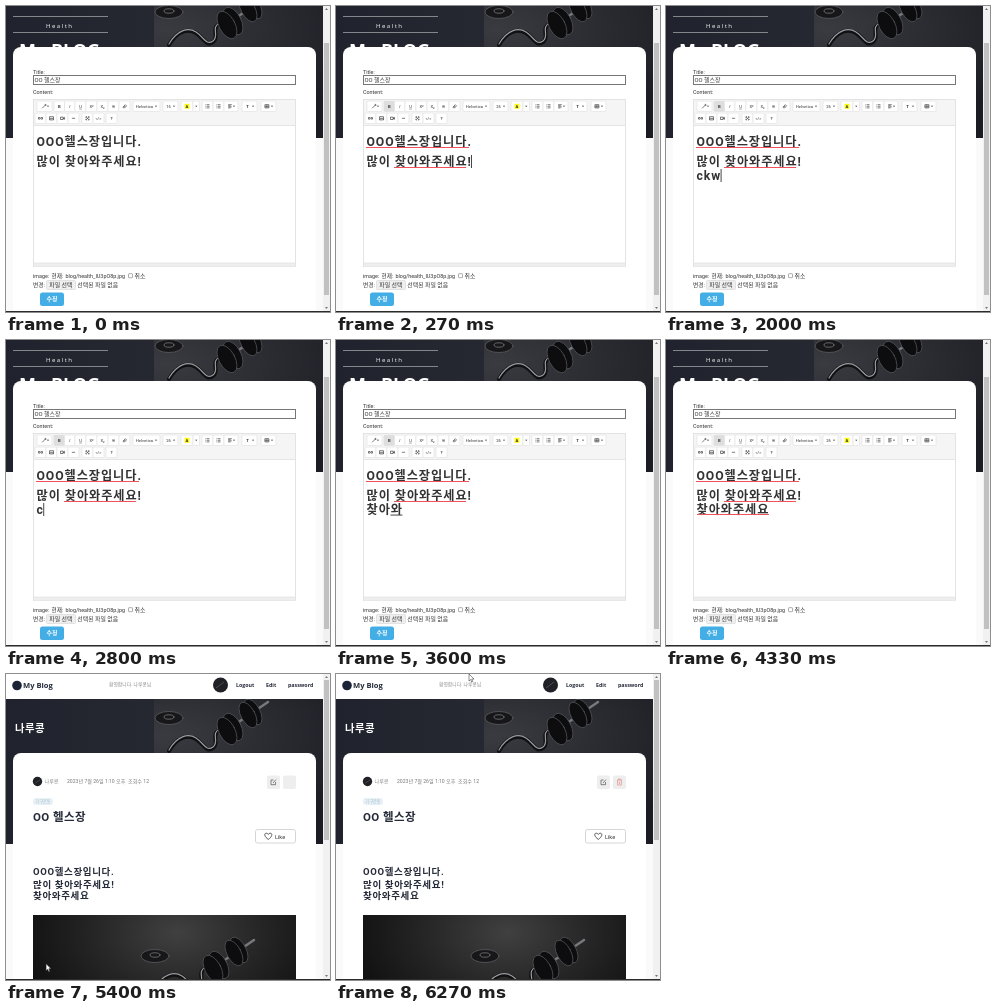
Animation, 324 px wide and 306 px high, one loop 6540 ms. Source, as an HTML page:

```html
<!DOCTYPE html>
<html lang="ko">
<head>
<meta charset="utf-8">
<title>Blog post edit</title>
<style>
  html, body { margin: 0; width: 100%; height: 100%; overflow: hidden; background: #fff; }
  svg { display: block; width: 324px; height: 306px; }
  text { font-family: Roboto, "Noto Sans CJK KR", "Noto Sans CJK", sans-serif; fill: #333; white-space: pre; }
  .brand { font-family: "Open Sans", "Noto Sans CJK KR", sans-serif; font-weight: 700; fill: #252b3a; }
  .bold { font-weight: 700; }
  .body { font-size: 12.2px; letter-spacing: .93px; }
  .post { font-size: 9.5px; letter-spacing: .65px; }
  .post text { fill: #242a38; }
  .mid { text-anchor: middle; }
  .icon { fill: none; stroke: #333; stroke-width: .8; }
</style>
</head>
<body>
<svg viewBox="0 0 324 306">
  <defs>
    <linearGradient id="navy">
      <stop offset="0" stop-color="#20232d"/><stop offset="1" stop-color="#262831"/>
    </linearGradient>
    <radialGradient id="floor" cx=".5" cy=".25" r=".7">
      <stop offset="0" stop-color="#3a3b41"/><stop offset=".5" stop-color="#2a2b31"/><stop offset="1" stop-color="#1b1c23"/>
    </radialGradient>
    <radialGradient id="studio" cx=".55" cy=".1" r=".65">
      <stop offset="0" stop-color="#404040"/><stop offset=".5" stop-color="#252525"/><stop offset="1" stop-color="#0d0d0d"/>
    </radialGradient>
    <g id="weights" fill="none" stroke-linecap="round">
      <ellipse cx="163" cy="44" rx="14" ry="6.5" fill="#17171a" stroke="#5b5c60" stroke-width=".8"/>
      <ellipse cx="163" cy="43" rx="5" ry="2.2" stroke="#77787c" stroke-width=".8"/>
      <path d="M163 77C171 63 182 60 190 65S200 79 207 74S204 60 214 56" stroke="#101012" stroke-width="4"/>
      <path d="M163 76C171 62 182 59 190 64S200 78 207 73S204 59 214 55" stroke="#9a9b9f" stroke-width="1.2"/>
      <path d="M218 58L262 28" stroke="#77787c" stroke-width="2.5"/>
      <g fill="#0d0d0f" stroke="#55565a" stroke-width=".7">
        <ellipse cx="247" cy="38" rx="7" ry="14" transform="rotate(-28 247 38)"/>
        <ellipse cx="242" cy="41" rx="7" ry="14" transform="rotate(-28 242 41)"/>
        <ellipse cx="227" cy="53" rx="8" ry="15" transform="rotate(-28 227 53)"/>
        <ellipse cx="221" cy="57" rx="8" ry="15" transform="rotate(-28 221 57)"/>
      </g>
    </g>
    <g id="hero">
      <rect y="25" width="317" height="145" fill="url(#floor)"/>
      <rect y="25" width="148" height="145" fill="url(#navy)"/>
      <use href="#weights"/>
    </g>
    <clipPath id="heroClip"><rect y="25" width="317" height="145"/></clipPath>
    <clipPath id="postClip"><rect x="27" y="241" width="263" height="65"/></clipPath>
  </defs>

  <g id="editPage">
    <rect width="324" height="306" fill="#fafafa"/>
    <g transform="translate(0 -38)"><use href="#hero" clip-path="url(#heroClip)"/></g>
    <path d="M7 10.5H102M7 26.5H102" stroke="#85868c" stroke-width="1"/>
    <text class="brand" x="40" y="22" font-size="6" letter-spacing="1.5" style="fill:#fff;font-weight:400">Health</text>
    <text class="brand" x="13" y="51" font-size="18" style="fill:#fff">My BLOG</text>
    <path d="M7 306V49a8 8 0 0 1 8-8H302a8 8 0 0 1 8 8V306Z" fill="#fff"/>

    <text x="27" y="68" font-size="5.4">Title:</text>
    <rect x="27.5" y="69.5" width="262" height="9" fill="#fff" stroke="#767676"/>
    <text x="28.5" y="76.3" font-size="5.9">OO 헬스장</text>
    <text x="27" y="88" font-size="5.4">Content:</text>

    <rect x="27.5" y="93.5" width="262" height="167" fill="#fff" stroke="#ddd" stroke-width=".8"/>
    <path d="M28 94H289V119.5H28Z" fill="#f5f5f5"/>
    <path d="M28 119.5H289" stroke="#ddd" stroke-width=".7"/>
    <rect x="28" y="257" width="261" height="3.5" fill="#eee"/>
    <path d="M28 257H289" stroke="#ddd" stroke-width=".6"/>
    <g id="toolbar"></g>

    <g class="bold body">
      <text x="30.5" y="140">OOO헬스장입니다.</text>
      <text x="30.5" y="160">많이 찾아와주세요!</text>
      <text id="typed" x="30.5" y="173.5"></text>
    </g>
    <path id="spelling" d="M30 141.5H133M58 161.5H130" stroke="#f0525c" stroke-width="1"/>
    <path id="lastSpelling" d="M31 174.5H103" stroke="#f0525c" stroke-width="1"/>
    <rect id="composing" y="174.6" width="12" height=".9" fill="#333"/>
    <rect id="caret" width=".9" height="13" fill="#333"/>

    <text x="27" y="272" font-size="5.4">image:</text>
    <text x="45.5" y="272" font-size="5.6">현재:</text>
    <text x="59.5" y="272" font-size="5.4">blog/health_IU3pO8p.jpg</text>
    <rect x="122.5" y="267.7" width="4" height="4" rx=".6" fill="#fff" stroke="#767676" stroke-width=".6"/>
    <text x="128.5" y="272" font-size="5.9">취소</text>
    <text x="27" y="281.3" font-size="5.7">변경:</text>
    <rect x="40.5" y="274.5" width="29" height="9" rx="1" fill="#efefef" stroke="#ccc" stroke-width=".5"/>
    <text x="43.3" y="281.3" font-size="5.9">파일 선택</text>
    <text x="71.3" y="281.3" font-size="5.9">선택된 파일 없음</text>
    <rect x="34" y="286.5" width="24" height="13.5" rx="2.5" fill="#43aee6"/>
    <text class="bold mid" x="46" y="295.4" font-size="5.9" style="fill:#fff">수정</text>
  </g>

  <g id="postPage">
    <rect width="324" height="306" fill="#fafafa"/>
    <rect width="317" height="25" fill="#fff"/>
    <circle cx="11" cy="11.5" r="4.8" fill="#1b2336"/>
    <text class="brand" x="17" y="14.2" font-size="7.6">My Blog</text>
    <text class="brand" x="230" y="13.4" font-size="5.3">Logout</text>
    <text class="brand" x="260" y="13.4" font-size="5.3">Edit</text>
    <text class="brand" x="282" y="13.4" font-size="5.3">password</text>
    <text x="103" y="11.6" font-size="4.8" style="fill:#888">환영합니다. 나루콩님</text>
    <circle cx="214.5" cy="11" r="7.5" fill="#202126"/>
    <path d="M210 14L218 8" stroke="#4c4d51" stroke-width="1"/>
    <use href="#hero" clip-path="url(#heroClip)"/>
    <text class="bold" x="9" y="58" font-size="10.4" letter-spacing=".4" style="fill:#fff">나루콩</text>
    <path d="M7 306V87a8 8 0 0 1 8-8H302a8 8 0 0 1 8 8V306Z" fill="#fff"/>

    <circle cx="31.5" cy="107.5" r="4.7" fill="#202126"/>
    <path d="M29 109L34 106" stroke="#4c4d51" stroke-width=".8"/>
    <g font-size="5.1">
      <text x="38.5" y="109.4" style="fill:#888">나루콩</text>
      <text x="61" y="109.4" style="fill:#777">2023년 7월 26일 1:10 오후</text>
      <text x="122" y="109.4" style="fill:#777">조회수 12</text>
    </g>
    <rect x="261" y="101.5" width="13" height="13.5" rx="2" fill="#eee"/>
    <path class="icon" style="stroke:#555;stroke-width:.7" d="M267.5 106H265V110.7H269.5V108M267 109L270 105.6"/>
    <rect x="277" y="101.5" width="13" height="13.5" rx="2" fill="#eee"/>
    <path id="trash" class="icon" style="stroke:#e39a9a" d="M281 106H286M282.5 106V105H284.5V106M281.6 106V111H285.4V106M283.5 107.5V110"/>
    <rect x="27" y="124" width="20" height="7" rx="3" fill="#e9f1f6"/>
    <text class="mid" x="37" y="129.2" font-size="4.2" style="fill:#9bb9c9">기구운동</text>
    <text class="bold" x="27" y="147.2" font-size="11.5" letter-spacing=".4" style="fill:#242a38">OO 헬스장</text>
    <rect x="249.5" y="155.5" width="40" height="13.5" rx="2" fill="#fff" stroke="#ccc" stroke-width=".8"/>
    <path class="icon" d="M262.3 165.4C256 161 259.5 157.3 262.3 160.3C265 157.3 268.6 161 262.3 165.4Z"/>
    <text x="269" y="164.5" font-size="5.6">Like</text>

    <g class="bold post">
      <text x="27" y="200.6">OOO헬스장입니다.</text>
      <text x="27" y="213.6">많이 찾아와주세요!</text>
      <text x="27" y="224.8">찾아와주세요</text>
    </g>
    <g clip-path="url(#postClip)">
      <rect x="27" y="241" width="263" height="175" fill="url(#studio)"/>
      <use href="#weights" transform="translate(-14 238)"/>
    </g>
  </g>

  <rect x="317" width="7" height="306" fill="#f1f1f1"/>
  <path d="M319 4L320.5 2L322 4ZM319 301L320.5 303L322 301Z" fill="#777"/>
  <rect id="thumb" x="318" width="5" fill="#c1c1c1"/>
  <rect y="305" width="324" height="1" fill="#2b2b2b"/>

  <g id="pointer" stroke-width=".5" stroke-linejoin="round" fill="#fff" stroke="#222">
    <path id="arrow" d="M0 0V7L1.6 5.6L2.7 8L3.8 7.5L2.7 5.1H5Z"/>
    <path id="hand" d="M0 0C-1 0-1 1-1 1V5L-2.2 4.2C-3 5-2.4 5.6 0 8.5H4.2C5.6 6 5.2 4 5 3.5L1 2.6V1C1 0 0 0 0 0Z"/>
    <path id="beam" d="M-1.5-4H1.5M0-4V4M-1.5 4H1.5" stroke-width=".8"/>
  </g>
</svg>

<script>
const LOOP = 6540, FOCUS = 70, ENTER = 1330, TYPING_DONE = 4330, POST_PAGE = 5400;
const el = id => document.getElementById(id);
const set = (id, attrs) => {
  for (const [name, value] of Object.entries(attrs)) el(id).setAttribute(name, value);
};
// 'inherit' keeps children of a hidden page hidden.
const show = (id, visible) => el(id).setAttribute('visibility', visible ? 'inherit' : 'hidden');

// Small icons are paths centred on 0,0.
const icons = {
  wand: 'M-3 2.5L1 -1.5M1 -3V-1M2.5 -1.5H.5',
  eraser: 'M-2 1L1 -2L2.5 -.5L0 2H-1.2ZM-.7 -.3L.8 1.2',
  list: 'M-2.5 -2H-1.7M-2.5 0H-1.7M-2.5 2H-1.7M-1 -2H2.5M-1 0H2.5M-1 2H2.5',
  align: 'M-3.5 -2H1M-3.5 -.7H-.5M-3.5 .7H1M-3.5 2H-.5',
  table: 'M-4.5 -2H.5V2H-4.5ZM-4.5 0H.5M-2 -2V2',
  link: 'M-.5 -1H-2.5V1H-.5M.5 -1H2.5V1H.5M-1.2 0H1.2',
  picture: 'M-2.5 -2H2.5V2H-2.5ZM-2 1.5L-.5 -.5L.5 .7L1.3 0L2.2 1.5',
  video: 'M-2.5 -1.5H.8V1.5H-2.5ZM.8 0L2.5 -1.2V1.2Z',
  rule: 'M-2 0H2',
  full: 'M-.6 -2H-2V-.6M.6 -2H2V-.6M-2 .6V2H-.6M2 .6V2H.6M-1.5 -1.5L1.5 1.5M1.5 -1.5L-1.5 1.5',
};
// [left, right, label or icon, has dropdown arrow]
const rows = [
  [100.3, [[31, 46, 'wand', 1], [48, 58.5, 'B'], [58.5, 69, 'I'], [69, 80, 'U'], [80, 91, 'X²'], [91, 102, 'X₂'],
    [102, 113, 'S'], [113, 124, 'eraser'], [127, 154, 'Helvetica', 1], [157, 172, 'size', 1], [175, 187, 'A'],
    [187, 193.5, '', 1], [196, 207, 'list'], [207, 218, 'list'], [218, 232, 'align', 1], [236, 251, 'T', 1], [255, 270, 'table', 1]]],
  [112.3, [[29, 40, 'link'], [40, 51, 'picture'], [51, 62, 'video'], [62, 73, 'rule'], [76, 87, 'full'],
    [87, 98, '</>'], [100, 111, '?']]],
];
const labelStyle = { I: 'font-style="italic"', U: 'text-decoration="underline"', S: 'text-decoration="line-through"' };

function toolButton(y, [left, right, label, drop]) {
  const mid = (left + right) / 2, id = label === 'B' ? 'id="boldButton"' : '';
  let out = `<rect ${id} x="${left}" y="${y - 5.2}" width="${right - left}" height="10.4" rx="1" fill="#fff" stroke="#e0e0e0" stroke-width=".6"/>`;
  if (label === 'A') out += `<rect x="${mid - 2.3}" y="${y - 2.5}" width="4.6" height="5" fill="#ff0"/>`;
  if (icons[label]) out += `<path class="icon" transform="translate(${mid} ${y}) scale(.8)" d="${icons[label]}"/>`;
  else if (label) {
    const weight = 'BAT?'.includes(label) ? 'class="mid bold"' : 'class="mid"';
    out += `<text ${label === 'size' ? 'id="fontSize"' : ''} ${weight} ${labelStyle[label] || ''} font-size="4.2" x="${mid - (drop ? 2 : 0)}" y="${y + 1.5}">${label.replace('<', '&lt;')}</text>`;
  }
  if (drop) {
    const x = label ? right - 4 : mid;
    out += `<path d="M${x - 1.1} ${y - .5}h2.2l-1.1 1.2z" fill="#333"/>`;
  }
  return out;
}
el('toolbar').innerHTML = rows.map(([y, buttons]) => buttons.map(b => toolButton(y, b)).join('')).join('');

// Typed first with the wrong keyboard layout, erased, then typed again in Hangul.
const wrong = 'ckwdkdhkw';
const keys = [[ENTER, '']];
[1730, 1870, 2000, 2130, 2200, 2270, 2330, 2400, 2470].forEach((at, i) => keys.push([at, wrong.slice(0, i + 1)]));
[[2530, 8], [2600, 6], [2670, 4], [2730, 3], [2800, 1], [2870, 0]].forEach(([at, n]) => keys.push([at, wrong.slice(0, n)]));
keys.push([3130, 'ㅊ'], [3270, '차'], [3400, '찾'], [3470, '찾아'], [3530, '찾아오'], [3600, '찾아와'], [3670, '찾아왖'],
  [3730, '찾아와주'], [3800, '찾아와줏'], [3870, '찾아와주세'], [3930, '찾아와주셍'], [4070, '찾아와주세요']);

const path = [[4670, 92, 205], [4870, 78, 238], [5070, 52, 278], [5270, 40, 292], [5400, 40, 290],
  [5530, 52, 250], [5730, 88, 140], [5930, 118, 50], [6070, 118, 50], [6270, 133, 0]];

function pointerAt(t) {
  const next = path.findIndex(p => p[0] > t);
  if (next < 0) return path[path.length - 1].slice(1);
  const [a, b] = [path[next - 1], path[next]];
  const k = (t - a[0]) / (b[0] - a[0]);
  return [1, 2].map(i => a[i] + (b[i] - a[i]) * k);
}

function drawEditor(t) {
  const key = keys.filter(([at]) => at <= t).pop();
  const text = key ? key[1] : '';
  const focused = t >= FOCUS;
  el('typed').textContent = text;
  const end = 30 + (text ? el('typed').getComputedTextLength() : 0);
  const composing = t >= 3130 && t < TYPING_DONE;
  show('composing', composing);
  set('composing', { x: end - 12 });
  show('spelling', focused);
  show('lastSpelling', t >= TYPING_DONE);
  set('boldButton', { fill: focused ? '#dedede' : '#fff' });
  el('fontSize').textContent = focused ? '26' : '16';

  const blinkStart = key ? key[0] : FOCUS;
  const caretOn = Math.floor((t - blinkStart) / 400) % 2 === 0;
  show('caret', focused && caretOn && !composing && t < TYPING_DONE);
  set('caret', key ? { x: end, y: 163 } : { x: 135, y: 149 });
}

function frame() {
  const t = performance.now() % LOOP, onPost = t >= POST_PAGE;
  show('editPage', !onPost);
  show('postPage', onPost);
  set('thumb', onPost ? { y: 6, height: 160 } : { y: 37, height: 252 });
  if (onPost) show('trash', t >= 5530);
  else drawEditor(t);

  const moving = t >= path[0][0];
  show('pointer', moving);
  if (moving) {
    const [x, y] = pointerAt(t);
    const overButton = !onPost && y > 287, overText = !onPost && y < 257;
    set('pointer', { transform: `translate(${x} ${y})` });
    show('hand', overButton);
    show('beam', overText);
    show('arrow', !overButton && !overText);
  }
  requestAnimationFrame(frame);
}
requestAnimationFrame(frame);
</script>
</body>
</html>
```
